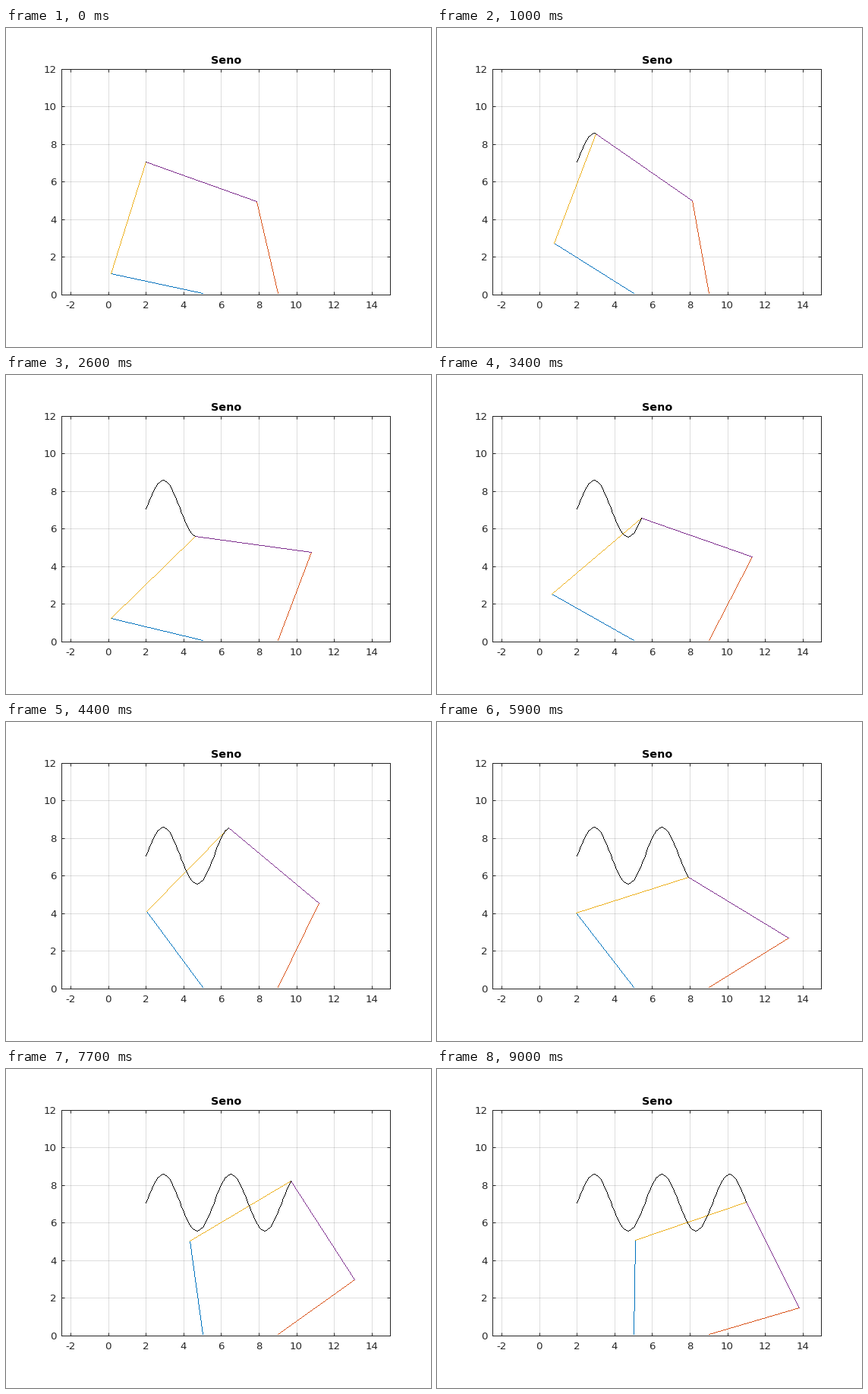
Write a matplotlib script that moves like this. It is 560 px wide and 420 px high and loops after 9.1 s.

```python
import numpy as np
import matplotlib.pyplot as plt
from matplotlib.animation import FuncAnimation
from matplotlib.transforms import IdentityTransform

W, H, DPI = 560, 420, 100
FRAMES, INTERVAL = 91, 100
PX = 72 / DPI                      # one pixel in points
UNIT = 24.78                       # pixels per data unit
INK = "#262626"

BASE_L, BASE_R = np.array([5.0, 0.0]), np.array([9.0, 0.0])
CRANK, ROD = 5.0, np.sqrt(39)

plt.rcParams.update({"font.family": "DejaVu Sans",
                     "axes.unicode_minus": False})

fig = plt.figure(figsize=(W / DPI, H / DPI), dpi=DPI, facecolor="white")
ax = fig.add_axes([72.81 / W, 69.04 / H, 17.5 * UNIT / W, 12 * UNIT / H])
ax.set(xlim=(-2.5, 15), ylim=(0, 12),
       xticks=range(-2, 15, 2), yticks=range(0, 13, 2))
ax.set_axisbelow(True)
ax.grid(color=INK, alpha=0.15, lw=PX)
ax.tick_params(direction="in", top=True, right=True, length=4.3 * PX,
               width=PX, color=INK, labelcolor=INK, labelsize=13.33 * PX)
ax.tick_params(axis="x", pad=8 * PX)
ax.tick_params(axis="y", pad=6 * PX)
for side in ax.spines.values():
    side.set(color=INK, linewidth=PX)
ax.set_title("Seno", fontsize=14.4 * PX, fontweight="bold", pad=7 * PX)


def line(color, z):
    """Crisp line made of single pixels, placed in display coordinates."""
    return ax.plot([], [], ",", color=color, zorder=z,
                   transform=IdentityTransform())[0]


crank_l, crank_r, rod_l, rod_r = (
    line(c, 3 + i) for i, c in
    enumerate(["#0072BD", "#D95319", "#EDB120", "#7E2F8E"]))
trace = line("black", 8)


def raster(points):
    """Pixels of the polyline through data points, one per major-axis step."""
    verts = np.rint(ax.transData.transform(points))
    runs = [verts[:1]]
    for a, b in zip(verts, verts[1:]):
        n = int(max(abs(b - a)))
        t = np.linspace(0, 1, n + 1)[:, None]
        runs.append(np.floor(a + t * (b - a) + 0.5))
    x, y = np.vstack(runs).T
    return x, y + 1                # pixel markers hang below their point


def elbow(base, tip, side):
    """Joint between crank and rod; side is +1 for left, -1 for right."""
    d = tip - base
    dist = np.hypot(*d)
    u = d / dist
    along = (CRANK**2 - ROD**2 + dist**2) / (2 * dist)
    off = np.sqrt(CRANK**2 - along**2)
    return base + along * u + side * off * np.array([-u[1], u[0]])


def path(n):
    x = 2 + 0.1 * np.arange(n + 1)
    return np.column_stack([x, 7 + 1.5 * np.sin(2 * np.pi * (x - 2) / 3.6)])


def draw(i):
    pts = path(i)
    tip = pts[-1]
    left, right = elbow(BASE_L, tip, 1), elbow(BASE_R, tip, -1)
    for ln, ends in ((crank_l, (BASE_L, left)), (crank_r, (BASE_R, right)),
                     (rod_l, (left, tip)), (rod_r, (right, tip))):
        ln.set_data(*raster(np.array(ends)))
    trace.set_data(*raster(pts))
    return crank_l, crank_r, rod_l, rod_r, trace


anim = FuncAnimation(fig, draw, frames=FRAMES, init_func=lambda: draw(0),
                     interval=INTERVAL, repeat=True, repeat_delay=0)
plt.show()
```
